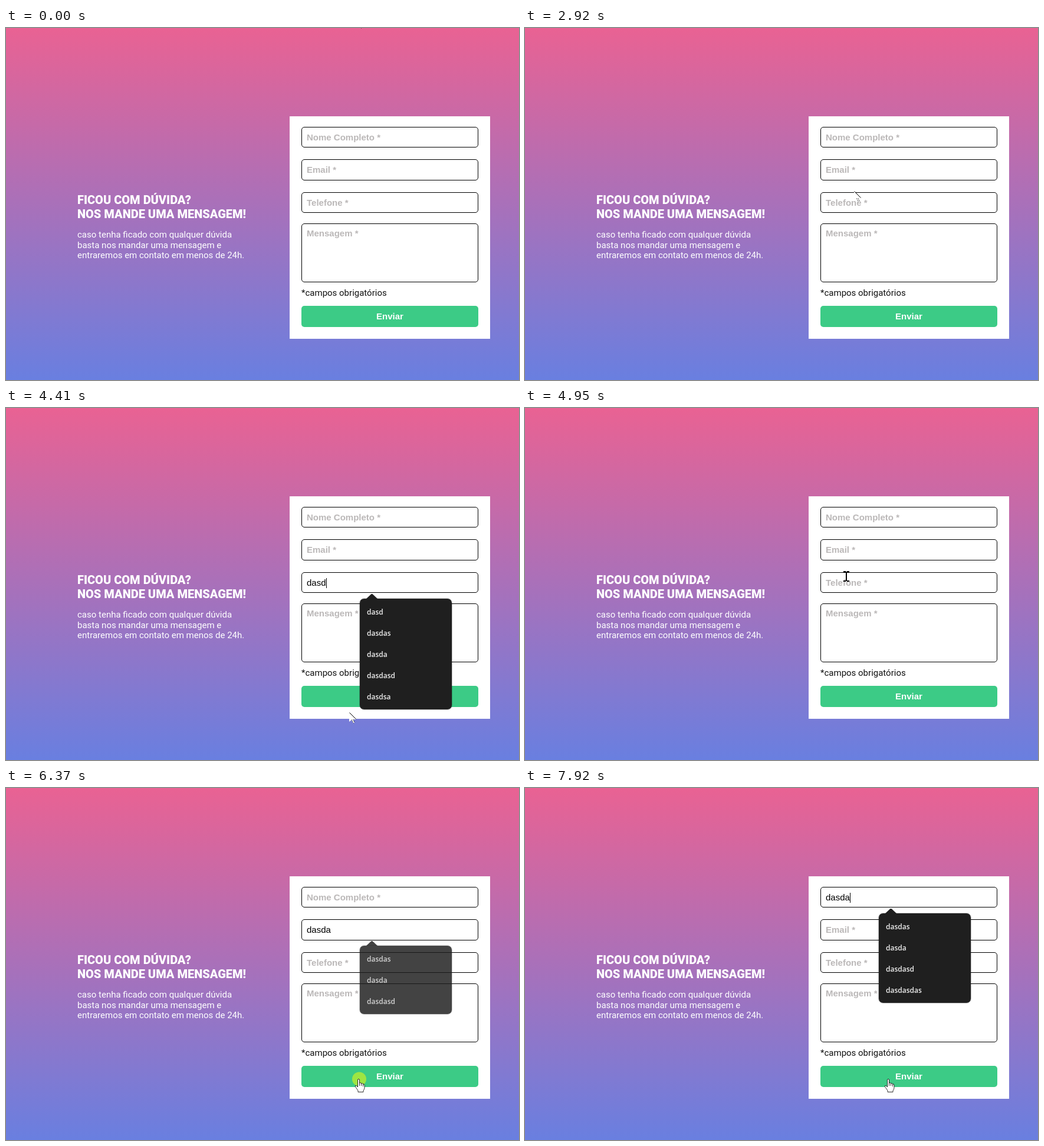
An HTML page with a canvas for the animation above (7.99 s loop, 870 px wide and 598 px high).

```html
<!DOCTYPE html>
<html lang="pt-BR">
<head>
<meta charset="utf-8">
<title>Formulário de contato</title>
<style>
  html, body { margin: 0; width: 100%; height: 100%; overflow: hidden; }
  canvas { display: block; width: 870px; height: 598px; }
</style>
</head>
<body>
<canvas id="stage" width="870" height="598"></canvas>
<script>
const ctx = document.getElementById('stage').getContext('2d');
const LOOP = 7990, STEP = 70, PHASE = 10, GLIDE = 210;
const KEY_DELAY = 150, KEY = 75, ERROR_DELAY = 70, RESET_DELAY = 350;
const ARIAL = '"Liberation Sans", Arial, sans-serif';
const ROBOTO = 'Roboto, sans-serif';
const GREEN = '#3ccb86', RED = '#f02020', DARK = '#1f1f1f';

const LEFT = 501, WIDTH = 300, ROW = 36;
const button = { x: LEFT, y: 472, w: WIDTH, h: ROW };
const box = (label, y, h) => ({ label, x: LEFT, y, w: WIDTH, h, base: y + 23 });
const name = box('Nome Completo *', 168, 35);
const email = box('Email *', 223, 36);
const phone = box('Telefone *', 279, 35);
const message = box('Mensagem *', 332, 100);
message.base = 354;
const fields = [name, email, phone, message];

// A visit: focus a field, type, submit; the form then shows errors and clears
const visits = [
  { field: message, focus: 870, submit: 2060, text: 'dasda', history: '' },
  { field: phone, focus: 3320, submit: 4476, text: 'dasd', history: 'dasd dasdas dasda dasdasd dasdsa' },
  { field: email, focus: 5160, submit: 6310, text: 'dasda', history: 'dasdas dasda dasdasd dasd dasdsa das' },
  { field: name, focus: 7220, submit: LOOP, text: 'dasda', history: 'dasdas dasda dasdasd dasdasdas dasd dasdsa' }
];

// Pointer stops: arrival time, x, y
const stops = [
  [390, 595, -18], [600, 613, 357], [1980, 600, 491], [2880, 558, 277],
  [3190, 560, 298], [3785, 540, 445], [4080, 570, 532], [4470, 600, 495],
  [4905, 545, 286], [5160, 560, 241], [5900, 585, 470], [6250, 600, 495],
  [7150, 715, 189], [7570, 665, 440], [7850, 618, 495]
];

const ease = u => u * u * (3 - 2 * u);

function pointerAt(t) {
  let [, x, y] = stops[0];
  for (const [end, toX, toY] of stops) {
    const u = ease(Math.min(1, Math.max(0, (t - end + GLIDE) / GLIDE)));
    x += (toX - x) * u;
    y += (toY - y) * u;
  }
  return { x: Math.round(x), y: Math.round(y) };
}

const inside = (p, b) => p.x >= b.x && p.x < b.x + b.w && p.y >= b.y && p.y < b.y + b.h;

function text(str, x, y, font, color, align = 'left') {
  ctx.font = font;
  ctx.fillStyle = color;
  ctx.textAlign = align;
  ctx.fillText(str, x, y);
}

function lines(list, y, gap, font) {
  list.forEach((line, i) => text(line, 121, Math.round(y + i * gap), font, '#fff'));
}

function roundRect(b, r, grow = 0) {
  ctx.beginPath();
  ctx.roundRect(b.x - grow, b.y - grow, b.w + 2 * grow, b.h + 2 * grow, r);
}

function drawPage() {
  const g = ctx.createLinearGradient(0, 0, 0, 598);
  g.addColorStop(0, '#e96293');
  g.addColorStop(1, '#697fe0');
  ctx.fillStyle = g;
  ctx.fillRect(0, 0, 870, 598);

  lines(['FICOU COM DÚVIDA?', 'NOS MANDE UMA MENSAGEM!'], 299, 24, '800 20px ' + ROBOTO);
  lines(['caso tenha ficado com qualquer dúvida', 'basta nos mandar uma mensagem e',
    'entraremos em contato em menos de 24h.'], 356, 17.5, '15px ' + ROBOTO);

  ctx.fillStyle = '#fff';
  ctx.fillRect(481, 150, 340, 378);
  text('*campos obrigatórios', LEFT, 455, '15px ' + ROBOTO, '#111');
  roundRect(button, 5);
  ctx.fillStyle = GREEN;
  ctx.fill();
  text('Enviar', 651, 495, 'bold 15px ' + ARIAL, '#fff', 'center');
}

function drawField(f, value, preview, border, caret) {
  roundRect(f, 4.5, -0.5);
  ctx.fillStyle = preview ? '#e8f0fe' : '#fff';
  ctx.fill();
  ctx.lineWidth = 1;
  ctx.strokeStyle = border;
  ctx.stroke();

  const shown = preview || value;
  if (shown) text(shown, 510, f.base, '15px ' + ARIAL, '#000');
  else text(f.label, 510, f.base, 'bold 15px ' + ARIAL, '#bbb8b8');

  if (caret && !preview) {
    const width = value ? ctx.measureText(value).width : 0;
    ctx.fillStyle = '#000';
    ctx.fillRect(Math.round(510 + width), f.base - 13, 1, 17);
  }
}

function popupFor(field, history, typed) {
  const list = history.split(' ').filter(word => word.startsWith(typed));
  return { x: 600, y: field.y + 45, w: typed.length < 2 ? 264 : 156, h: list.length * ROW + 8, list };
}

function drawPopup(p, alpha) {
  ctx.save();
  ctx.globalAlpha = alpha;
  roundRect(p, 8, 0.5);
  ctx.strokeStyle = 'rgba(0,0,0,.25)';
  ctx.stroke();
  roundRect(p, 7);
  ctx.moveTo(611, p.y);
  ctx.lineTo(619.5, p.y - 8);
  ctx.lineTo(621.5, p.y - 8);
  ctx.lineTo(630, p.y);
  ctx.fillStyle = DARK;
  ctx.fill();
  p.list.forEach((word, i) =>
    text(word, 612, p.y + 27 + i * ROW, '600 12px "Open Sans", sans-serif', '#eee'));
  ctx.restore();
}

const arrowFill = new Path2D('M0 0V16L4 13L7 18.5L9 17.5L7 12H12Z');
const arrowLine = new Path2D('M.5 .5L11.5 11.5');
const arrowTail = new Path2D('M4.5 12.5L7.5 18.5M7 12.5L9.5 17.5');
const hand = new Path2D('M-3.5 13V1Q-3.5 -.5 -2 -.5Q-.5 -.5 -.5 1V6Q2 5 2.5 7' +
  'Q5 6 5.5 8Q8 7.5 8 10V14Q8 17 6 19V21.5H-3V19L-7.5 12.5Q-8 10 -6 10.5Z');
const knuckles = new Path2D('M-.5 6V11M2.5 7V11M5.5 8V12');

function drawArrow() {
  ctx.fill(arrowFill);
  ctx.stroke(arrowLine);
  ctx.setLineDash([1.5, 1.5]);
  ctx.stroke(arrowTail);
}

function drawHand() {
  ctx.fill(hand);
  ctx.lineWidth = 0.8;
  ctx.stroke(hand);
  ctx.stroke(knuckles);
}

function drawBeam() {
  ctx.fillStyle = '#000';
  ctx.fillRect(-1, -8, 2, 16);
  for (const y of [-9, 7]) {
    ctx.fillRect(-5, y, 4, 2);
    ctx.fillRect(1, y, 4, 2);
  }
}

function drawPointer(p, hover, pressed) {
  ctx.save();
  ctx.translate(p.x, p.y);
  if (pressed) {
    ctx.fillStyle = 'rgba(255,255,0,.5)';
    ctx.beginPath();
    ctx.arc(-1, -0.5, 12, 0, Math.PI * 2);
    ctx.fill();
  }
  ctx.lineWidth = 1;
  ctx.fillStyle = '#fff';
  ctx.strokeStyle = '#000';
  if (!hover && fields.some(f => inside(p, f))) drawBeam();
  else if (!hover && inside(p, button)) drawHand();
  else drawArrow();
  ctx.restore();
}

function draw(now) {
  const t = Math.max(0, Math.floor((now % LOOP - PHASE) / STEP) * STEP + PHASE);
  const pointer = pointerAt(t);
  const visit = visits.find(v => t >= v.focus && t < v.submit + RESET_DELAY);
  let typed = '', popup = null, alpha = 0, hover = false, preview = '';

  if (visit) {
    const keys = Math.floor((t - visit.focus - KEY_DELAY) / KEY) + 1;
    typed = visit.text.slice(0, Math.max(0, keys));
    alpha = t < visit.submit ? 1 : 0.835 - (t - visit.submit) / 125;
    if (typed && visit.history && alpha > 0) {
      popup = popupFor(visit.field, visit.history, typed);
      hover = inside(pointer, popup);
      const row = Math.floor((pointer.y - popup.y - 4) / ROW);
      if (hover) preview = popup.list[row] || '';
    }
  }

  drawPage();
  const failed = visit && t >= visit.submit + ERROR_DELAY;
  for (const f of fields) {
    const active = visit && visit.field === f;
    const border = failed ? (active ? GREEN : RED) : '#000';
    drawField(f, active ? typed : '', active ? preview : '', border, active && t < visit.submit);
  }
  if (popup) drawPopup(popup, alpha);

  const clicked = time => t >= time && t < time + STEP;
  drawPointer(pointer, hover, visit && (clicked(visit.focus) || clicked(visit.submit)));
}

const begin = performance.now();
function tick() {
  draw(performance.now() - begin);
  requestAnimationFrame(tick);
}
tick();
</script>
</body>
</html>
```
